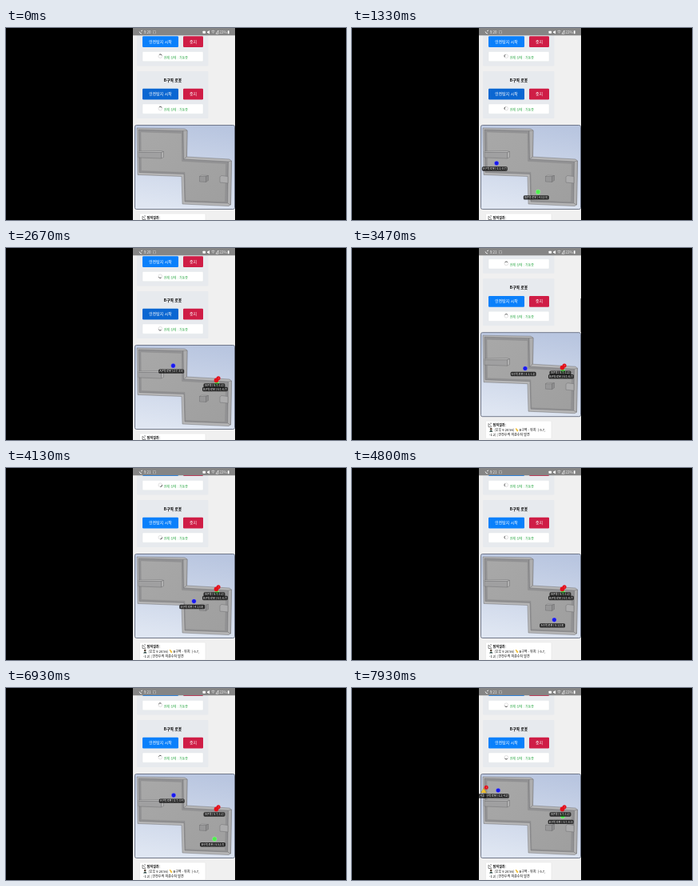
An HTML page for the animation above (7990 ms loop, 426 by 240 pixels).

```html
<!DOCTYPE html>
<html lang="ko">
<head>
<meta charset="utf-8">
<title>Robot monitor</title>
<style>
  html, body { margin: 0; width: 100%; height: 100%; overflow: hidden; background: #000; }
  svg { display: block; width: 100vw; height: 100vh; }
  text { font-family: "Noto Sans CJK KR", "Noto Sans CJK", "Noto Sans", sans-serif; font-size: 4px; }
  .mid { text-anchor: middle; }
  .bold { font-weight: 700; }
  .btn { font-size: 4.9px; font-weight: 500; fill: #fff; text-anchor: middle; }
  .state { fill: #32ab4b; }
  .bar text { font-size: 4.5px; fill: #eee; }
  .tag text { font-size: 3.2px; fill: #fff; text-anchor: middle; }
  .wall { stroke: #6c6c6e; stroke-width: .45; stroke-linejoin: round; }
</style>
</head>
<body>
<svg viewBox="0 0 426 240">
  <defs>
    <clipPath id="screen"><rect x="159" width="128" height="240"/></clipPath>
    <linearGradient id="sky" x1=".6" y1="0" x2=".4" y2="1">
      <stop offset="0" stop-color="#b9c6e0"/><stop offset="1" stop-color="#dfe6f2"/>
    </linearGradient>
    <linearGradient id="floor" x1="0" y1="0" x2="1" y2="1">
      <stop offset="0" stop-color="#a8a8a8"/><stop offset="1" stop-color="#9f9f9f"/>
    </linearGradient>
  </defs>
  <rect width="426" height="240"/>
  <g clip-path="url(#screen)">
    <rect x="159" width="128" height="240" fill="#f0f0f0"/>
    <g id="page">
      <g id="cards"></g>

      <rect x="161.500" y="121.500" width="125" height="105" rx="2" fill="url(#sky)" stroke="#666e80" stroke-width=".9"/>
      <g class="wall">
        <path d="M164 125L224 126L227 128L226.500 161L280 164L282.500 166L281.500 221L279 222.500L221 220L220 185.500L165 183.500Z" fill="#b6b6b7"/>
        <path d="M166 127L222 128.500L222.500 164L278.500 167L277.500 219L224 217L223 182.500L167 180.500Z" fill="#929294"/>
        <path d="M169 130L220 131.500L220.500 166.500L275.500 169.500L274.500 217.500L225 215.500L224 180.500L169.500 178.500Z" fill="url(#floor)" stroke="#858585" stroke-width=".3"/>
        <path d="M222 128.500L227 128L226.500 161L222.500 164Z" fill="#adadae"/>
        <path d="M278.500 167L282.500 166L281.500 221L277.500 219Z" fill="#b0b0b1"/>
        <path d="M166 155.500L194.500 155.500V163L166 162Z" fill="#a0a0a1"/>
        <path d="M166 154L194 153.500L197.500 154.500L194.500 155.500H166Z" fill="#b7b7b7"/>
        <path d="M194.500 155.500L197.500 154.500V161.500L194.500 163Z" fill="#b0b0b0"/>
        <path d="M242.500 185.500H250.500V192.500L242.500 192Z" fill="#979798"/>
        <path d="M242.500 185.500L245 184L253.500 184.500L250.500 185.500Z" fill="#b5b5b5"/>
        <path d="M250.500 185.500L253.500 184.500V190.500L250.500 192.500Z" fill="#8d8d8e"/>
        <path d="M268 186L270 184.500L278 185.500V194L268 193Z" fill="#acacad"/>
      </g>

      <rect x="167.5" y="232" width="82.500" height="22" rx="1" fill="#fff" stroke="#e3e3e3" stroke-width=".5"/>
      <path d="M171 235V239.500H175M171.500 235.500L174.500 238.500M173 235H175" fill="none" stroke="#555" stroke-width=".7"/>
      <text class="bold" x="176.800" y="238.600">탐지결과:</text>
      <circle cx="174.200" cy="242" r="1.300" fill="#5a4636"/>
      <path d="M172 245.500Q174.200 241.500 176.500 245.500Z" fill="#26433f"/>
      <text x="178.500" y="244.700">[오후 9:20:56]</text>
      <path d="M204.500 241.500L206 241L208.500 244L207 245.500Z" fill="#f0c03c"/>
      <text x="209.500" y="244.700">B구역 - 위치: [-5.7,</text>
      <text x="172" y="250.700">-1.2] | 안전수칙 미준수자 발견</text>

      <g id="marks"></g>
    </g>
    <rect id="thumb" x="286" y="63" width="1" height="42" fill="#888"/>

    <g class="bar">
      <rect x="159" width="128" height="9.300" fill="#858585"/>
      <path d="M167 4.500Q167.500 7 170 7M169 4L171 3" fill="none" stroke="#fff" stroke-width=".8"/>
      <text id="clock" x="172.800" y="6.800"></text>
      <rect x="184.500" y="3.500" width="3" height="3.500" fill="none" stroke="#ddd" stroke-width=".5" stroke-dasharray="1 .5"/>
      <rect x="246.500" y="3.800" width="3.500" height="3" rx=".5" fill="#fff"/>
      <path d="M252 4.500H253L255 3V7.500L253 6H252Z" fill="#fff"/>
      <path d="M257.500 4Q259.500 2.500 261.500 4M258.500 5.500Q259.500 4.700 260.500 5.500M259.500 6.500V7M263 7.200L266 3V7.200Z" fill="none" stroke="#fff" stroke-width=".6"/>
      <text x="267.500" y="6.800">22%</text>
      <rect x="277.800" y="3.200" width="1.800" height="4" rx=".4" fill="#fff"/>
    </g>
  </g>
</svg>
<script>
const LOOP = 7990, STEPS = 120;
const $ = id => document.getElementById(id);

function add(parent, tag, attrs, content) {
  const el = document.createElementNS('http://www.w3.org/2000/svg', tag);
  for (const k in attrs) el.setAttribute(k, attrs[k]);
  if (content) el.textContent = content;
  parent.append(el);
  return el;
}

function button(g, x, y, width, fill, label) {
  const box = add(g, 'rect', { x, y, width, height: 13.7, rx: 1.2, fill });
  add(g, 'text', { class: 'btn', x: x + width / 2, y: y + 8.2 }, label);
  return box;
}

function card(y, title) {
  const g = $('cards');
  add(g, 'rect', { x: 164, y, width: 89.5, height: 59, rx: 1, fill: '#e7eaee' });
  add(g, 'text', { class: 'mid bold', x: 209, y: y + 13, style: 'font-size:4.8px' }, title);
  const start = button(g, 171, y + 21.8, 45, '#0a80fb', '안전탐지 시작');
  button(g, 222, y + 21.8, 25, '#cf1d46', '중지');
  add(g, 'rect', { x: 171, y: y + 41, width: 76, height: 12.3, rx: 1, fill: '#fff', stroke: '#dfe2e5', 'stroke-width': .4 });
  const cx = 193.3, cy = y + 46.7;
  add(g, 'circle', { cx, cy, r: 2.3, fill: 'none', stroke: '#ddd', 'stroke-width': .9 });
  const arc = add(g, 'path', { d: 'M-1.63 -1.63A2.3 2.3 0 0 1 1.63 -1.63', fill: 'none', stroke: '#555', 'stroke-width': .9 });
  add(g, 'text', { class: 'state', x: 197.7, y: y + 50.1 }, '현재 상태 : 가동중');
  return { start, spin: a => arc.setAttribute('transform', `translate(${cx} ${cy}) rotate(${a})`) };
}

function tag(g, x, y, width, label) {
  const t = add(g, 'g', { class: 'tag' });
  add(t, 'rect', { x: x - width / 2, y: y - 2.7, width, height: 5.4, rx: 1.6, fill: '#111', 'fill-opacity': .82 });
  return add(t, 'text', { x, y: y + 1.2 }, label);
}

function robot(name, fill) {
  const g = add($('marks'), 'g', {});
  const label = tag(g, -2.3, 7, 32, '');
  add(g, 'circle', { r: 2.8, fill, stroke: '#fff', 'stroke-opacity': .5, 'stroke-width': .4 });
  return (x, y) => {
    g.setAttribute('transform', `translate(${x} ${y})`);
    const px = ((161 - x) * .0553).toFixed(1), py = ((y - 174.5) * .13).toFixed(1);
    label.textContent = `${name} 로봇 [${px},${py}]`;
  };
}

function badge(g, cx, cy) {
  add(g, 'circle', { cx, cy, r: 2.5, fill: '#e3101c' });
  add(g, 'rect', { x: cx - .2, y: cy - .9, width: .4, height: 1.8, fill: '#fff', 'fill-opacity': .6 });
}

// Linear interpolation in rows of [time, ...values]
function at(rows, t) {
  const i = rows.findIndex(r => r[0] > t);
  if (i < 0) return rows[rows.length - 1].slice(1);
  if (i === 0) return rows[0].slice(1);
  const a = rows[i - 1], b = rows[i], k = (t - a[0]) / (b[0] - a[0]);
  return a.slice(1).map((v, j) => v + (b[j + 1] - v) * k);
}

const bluePath = [[400, 180, 169], [1330, 181, 169], [2000, 204, 167], [2670, 209.5, 147], [3470, 217, 166.5],
  [4000, 232, 176], [4800, 253.5, 204], [5700, 232, 176], [6200, 217, 167], [6930, 210, 148], [7930, 183, 142]];
const greenPath = [[400, 230, 211], [1330, 233, 205], [2400, 264.3, 169.5], [4800, 264.3, 169.5],
  [6000, 262, 203], [6930, 261.3, 202.7], [7930, 264, 174.2]];
const scrollPath = [[3230, 0], [3400, -15.8], [3540, -15.8], [3800, -14]];

const cards = [card(-11.5, 'A구역 로봇'), card(54, 'B구역 로봇')];
const moveGreen = robot('B구역', '#4df04d');
const moveBlue = robot('A구역', '#1919ee');

const alarm = add($('marks'), 'g', {});
tag(alarm, 261, 172, 27, 'B구역 [-5.7,-1.2]');
add(alarm, 'circle', { cx: 263.5, cy: 165.4, r: 2.8, fill: '#e3101c' });
badge(alarm, 266.1, 162.7);

const warning = add($('marks'), 'g', {});
tag(warning, 155, 149, 26, 'A구역 [-0.2,-4.2]');
add(warning, 'path', { d: 'M165 139L168.500 145H161.500Z', fill: '#f2c230', stroke: '#8a6a10', 'stroke-width': .3 });
badge(warning, 168.2, 138.2);

const show = (el, on) => el.setAttribute('visibility', on ? 'visible' : 'hidden');

function draw(now) {
  const step = Math.floor(((now % LOOP) + 4) * STEPS / LOOP) % STEPS;
  const t = step * LOOP / STEPS + 2;
  const scrolled = t > 3230;
  $('page').setAttribute('transform', `translate(0 ${at(scrollPath, t)[0]})`);
  $('clock').textContent = scrolled ? '9:21' : '9:20';
  cards[1].start.setAttribute('fill', scrolled ? '#0a80fb' : '#0b67d2');
  $('thumb').setAttribute('opacity', scrolled ? at([[3600, .8], [4000, 0]], t)[0] : 0);
  cards.forEach(c => c.spin((t - 3470) * 360 / 1770));
  moveBlue(...at(bluePath, t));
  moveGreen(...at(greenPath, t));
  for (const el of $('marks').children) show(el, t > 400);
  show(alarm, t > 2380);
  show(warning, t > 7500);
}

const begin = performance.now();
function tick() {
  draw(performance.now() - begin);
  requestAnimationFrame(tick);
}
tick();
</script>
</body>
</html>
```
